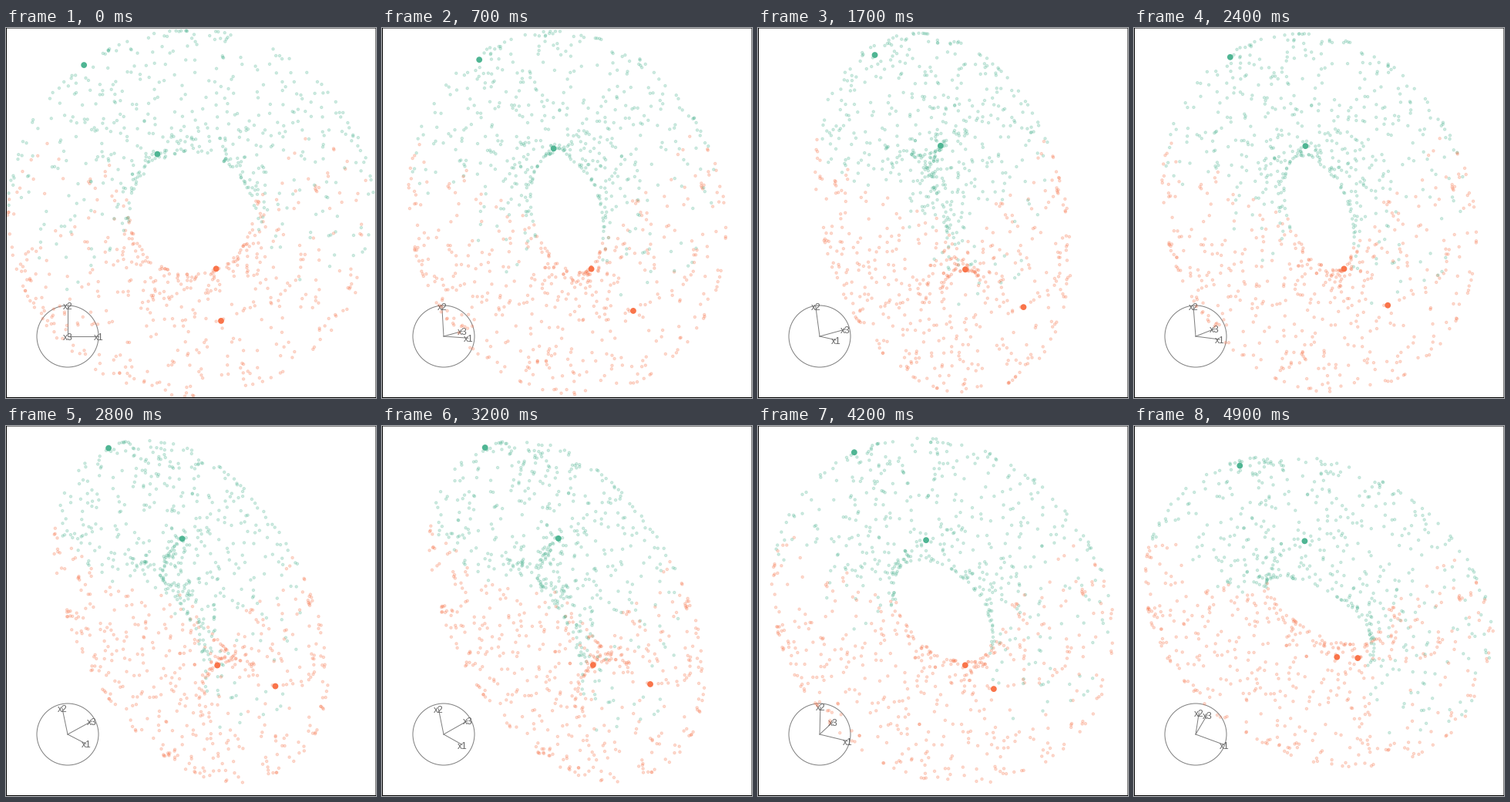
A matplotlib script that plays this animation: 480x480 px, repeating every 5000 ms.

```python
import math
import numpy as np
import matplotlib.pyplot as plt
from matplotlib.animation import FuncAnimation
from matplotlib.patches import Circle

SIZE, DPI = 480, 72
FRAMES, INTERVAL = 50, 100
TUBE = 79.3                       # tube radius in px; ring radius is twice that
GREEN, ORANGE = "#4fb593", "#f9744a"
LINE, TEXT = "#7f7f7f", "#666666"
CENTER, HUB, ARM = np.array([SIZE / 2, SIZE / 2]), np.array([80, 400]), 40

# The view turns at a steady pace from one tilt (right, up) of x3 to the next
MAX_STEP = 0.103
TILTS = [(.94, .26), (.51, .115), (.762, .588), (.40, .20), (.275, .805), (.193, .71)]


def torus(theta, phi):
    ring = 2 + np.cos(phi)
    points = TUBE * np.column_stack(
        [ring * np.cos(theta), ring * np.sin(theta), np.sin(phi)])
    upper = np.sin(theta - 0.6 * np.sin(phi)) > 0
    return points, np.where(upper, GREEN, ORANGE)


def tour():
    """Projection rows (right, up) per frame, carried along great circles without spin."""
    rows, view = np.eye(3)[:2], np.eye(3)[2]
    poses = [rows]
    for right, up in TILTS:
        target = np.array([-right, -up, math.sqrt(1 - right**2 - up**2)])
        angle = math.acos(view @ target)
        ahead = (target - math.cos(angle) * view) / math.sin(angle)
        steps = math.ceil(angle / MAX_STEP)
        for turn in np.linspace(0, angle, steps + 1)[1:]:
            turned = ahead * math.cos(turn) - view * math.sin(turn)
            poses.append(rows + np.outer(rows @ ahead, turned - ahead))
        rows, view = poses[-1], target
    return poses


def to_screen(points, rows, center, scale=1):
    return center + scale * (points @ rows.T) * [1, -1]


rng = np.random.default_rng(11)
cloud, cloud_colors = torus(*rng.uniform(0, 2 * np.pi, (2, 996)))
marked, marked_colors = torus(np.array([2.197, 2.09, -1.147, -1.299]),
                              np.array([0.16, 2.67, 3.11, 1.74]))
poses = tour()

fig = plt.figure(figsize=(SIZE / DPI, SIZE / DPI), dpi=DPI, facecolor="white")
ax = fig.add_axes([0, 0, 1, 1])
ax.set(xlim=(0, SIZE), ylim=(SIZE, 0))
ax.axis("off")

ax.add_patch(Circle(HUB, ARM, fill=False, ec=LINE, lw=1, zorder=1))
arms = [ax.plot([], [], color=LINE, lw=1, zorder=1)[0] for _ in range(3)]
labels = [ax.text(0, 0, f"x{i}", family="Liberation Sans", size=12, color=TEXT,
                  ha="center", va="baseline", zorder=1) for i in (1, 2, 3)]

dots = ax.scatter(*cloud[:, :2].T, s=3.4**2, c=cloud_colors,
                  edgecolors=cloud_colors, lw=1, alpha=0.25, zorder=2)
big_dots = ax.scatter(*marked[:, :2].T, s=7.8**2, c=marked_colors, lw=0, zorder=3)
ax.plot([0.5, 0.5, SIZE, SIZE, 0.5], [0, SIZE - 0.5, SIZE - 0.5, 0, 0],
        color="black", lw=1, snap=False, clip_on=False, zorder=4)


def update(frame):
    rows = poses[frame]
    dots.set_offsets(to_screen(cloud, rows, CENTER))
    big_dots.set_offsets(to_screen(marked, rows, CENTER))
    tips = to_screen(np.eye(3), rows, HUB, ARM)
    for arm, label, (x, y) in zip(arms, labels, tips):
        arm.set_data([HUB[0], x], [HUB[1], y])
        label.set_position((x, y + 5))
    return [dots, big_dots, *arms, *labels]


anim = FuncAnimation(fig, update, frames=FRAMES, interval=INTERVAL, repeat=True,
                     repeat_delay=0)
plt.show()
```
